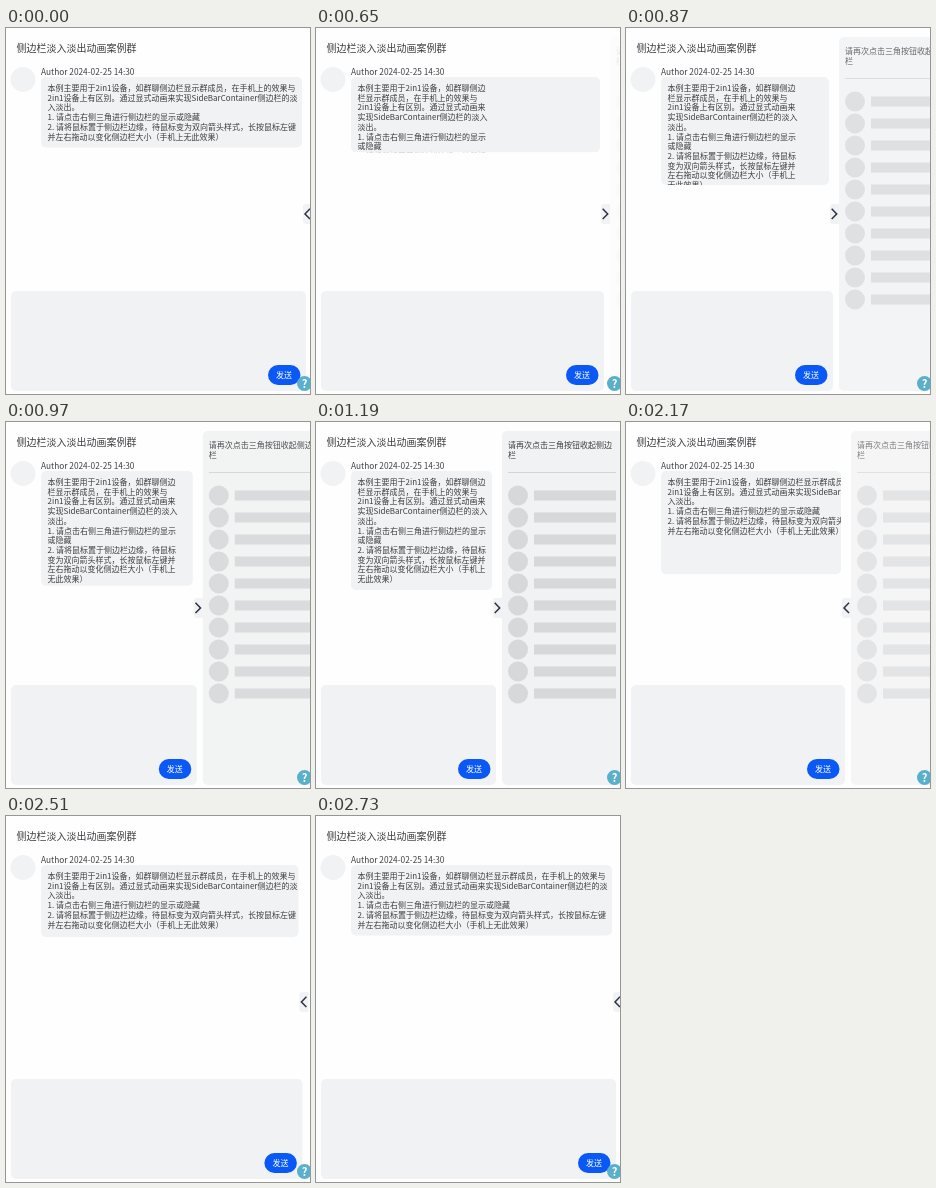
These frames come from a looping animation (304x366 px, 3180 ms). An HTML page:

```html
<!DOCTYPE html>
<html lang="zh-CN">
<meta charset="utf-8">
<style>
  html, body { margin: 0; width: 100%; height: 100%; overflow: hidden; background: #fefefe; }
  svg { display: block; width: 304px; height: 366px; font: 8px "Noto Sans CJK SC", "Noto Sans CJK", "Noto Sans", sans-serif; }
  text { fill: #3c3d40; white-space: pre; }
  .panel { fill: #f1f2f3; }
  .item { fill: #d7d8da; }
</style>
<svg viewBox="0 0 304 366">
  <defs><clipPath id="clip"><rect id="clipBox" x="35" y="49"/></clipPath></defs>
  <text x="10.5" y="24" font-size="10">侧边栏淡入淡出动画案例群</text>
  <circle class="panel" cx="17" cy="51.5" r="12.5"/>
  <text x="35" y="47" font-size="8.3">Author 2024-02-25 14:30</text>
  <rect class="panel" id="bubble" x="35" y="49" rx="5"/>
  <g clip-path="url(#clip)"><g id="wide"></g><g id="narrow"></g></g>
  <rect class="panel" id="input" x="5" y="263" height="100" rx="5"/>
  <g id="send">
    <rect x="-38" y="337" width="32.5" height="20" rx="10" fill="#0a59f7"/>
    <text x="-30" y="350" font-weight="500" style="fill:#fff">发送</text>
  </g>
  <g id="side">
    <rect class="panel" y="9" width="130" height="354" rx="5"/>
    <text x="6" y="26">请再次点击三角按钮收起侧边</text>
    <text x="6" y="36">栏</text>
    <path d="M6 50.5h108" stroke="#d3d4d6"/>
    <g id="members" class="item"></g>
  </g>
  <g id="handle">
    <path d="M0 176h-6q-3 0-3 3v14q0 3 3 3h6z" fill="#f1f2f4"/>
    <path id="arrow" fill="none" stroke="#2b3245" stroke-width="1.5"/>
  </g>
  <circle cx="298.5" cy="355.5" r="7.5" fill="#58b0cb"/>
  <text x="298.5" y="359.7" font-size="11" font-weight="700" text-anchor="middle" style="fill:#fff">?</text>
</svg>
<script>
const $ = id => document.getElementById(id);
const LOOP = 3180, SIDE = 120, OPEN_AT = 650, CLOSE_AT = 2170;

// [time, visible share of the sidebar], each held until the next
const steps = [
  [0, 0],
  [650, .1], [750, .44], [870, .775], [970, .91], [1090, .985], [1190, 1],
  [2170, .675], [2290, .225], [2390, .09], [2510, .03], [2630, .01], [2730, 0]
];

const wide = `本例主要用于2in1设备，如群聊侧边栏显示群成员，在手机上的效果与
2in1设备上有区别。通过显式动画来实现SideBarContainer侧边栏的淡
入淡出。
1. 请点击右侧三角进行侧边栏的显示或隐藏
2. 请将鼠标置于侧边栏边缘，待鼠标变为双向箭头样式，长按鼠标左键
并左右拖动以变化侧边栏大小（手机上无此效果）`;
const narrow = `本例主要用于2in1设备，如群聊侧边
栏显示群成员，在手机上的效果与
2in1设备上有区别。通过显式动画来
实现SideBarContainer侧边栏的淡入
淡出。
1. 请点击右侧三角进行侧边栏的显示
或隐藏
2. 请将鼠标置于侧边栏边缘，待鼠标
变为双向箭头样式，长按鼠标左键并
左右拖动以变化侧边栏大小（手机上
无此效果）`;

const lines = text => text.split('\n')
  .map((line, i) => `<text x="41.5" y="${63 + i * 9.7}">${line}</text>`).join('');
$('wide').innerHTML = lines(wide);
$('narrow').innerHTML = lines(narrow);
$('members').innerHTML = Array.from({ length: 10 }, (_, i) => {
  const y = 73.5 + i * 22;
  return `<circle cx="16" cy="${y}" r="10"/><rect x="32" y="${y - 5}" width="82" height="10"/>`;
}).join('');

function set(id, attrs) {
  for (const name in attrs) $(id).setAttribute(name, attrs[name]);
}

function draw(time) {
  const share = steps.findLast(step => step[0] <= time)[1];
  const right = 300 - SIDE * share, sideX = right + 6;
  const opened = time >= OPEN_AT && time < CLOSE_AT;
  const bubble = { width: right - 39, height: 70.5 + 48.5 * share };
  set('bubble', bubble);
  set('clipBox', bubble);
  set('wide', { visibility: opened ? 'hidden' : 'visible' });
  set('narrow', { visibility: opened ? 'visible' : 'hidden' });
  set('input', { width: right - 5 });
  set('send', { transform: `translate(${right})` });
  set('side', { transform: `translate(${sideX})`, opacity: share });
  set('handle', { transform: `translate(${sideX})` });
  set('arrow', { d: opened ? 'M-7.3 180.7l5 5.2l-5 5.2' : 'M-2 180.7l-5 5.2l5 5.2' });
}

const start = performance.now();
function tick() {
  draw((performance.now() - start) % LOOP);
  requestAnimationFrame(tick);
}
tick();
</script>
</html>
```
